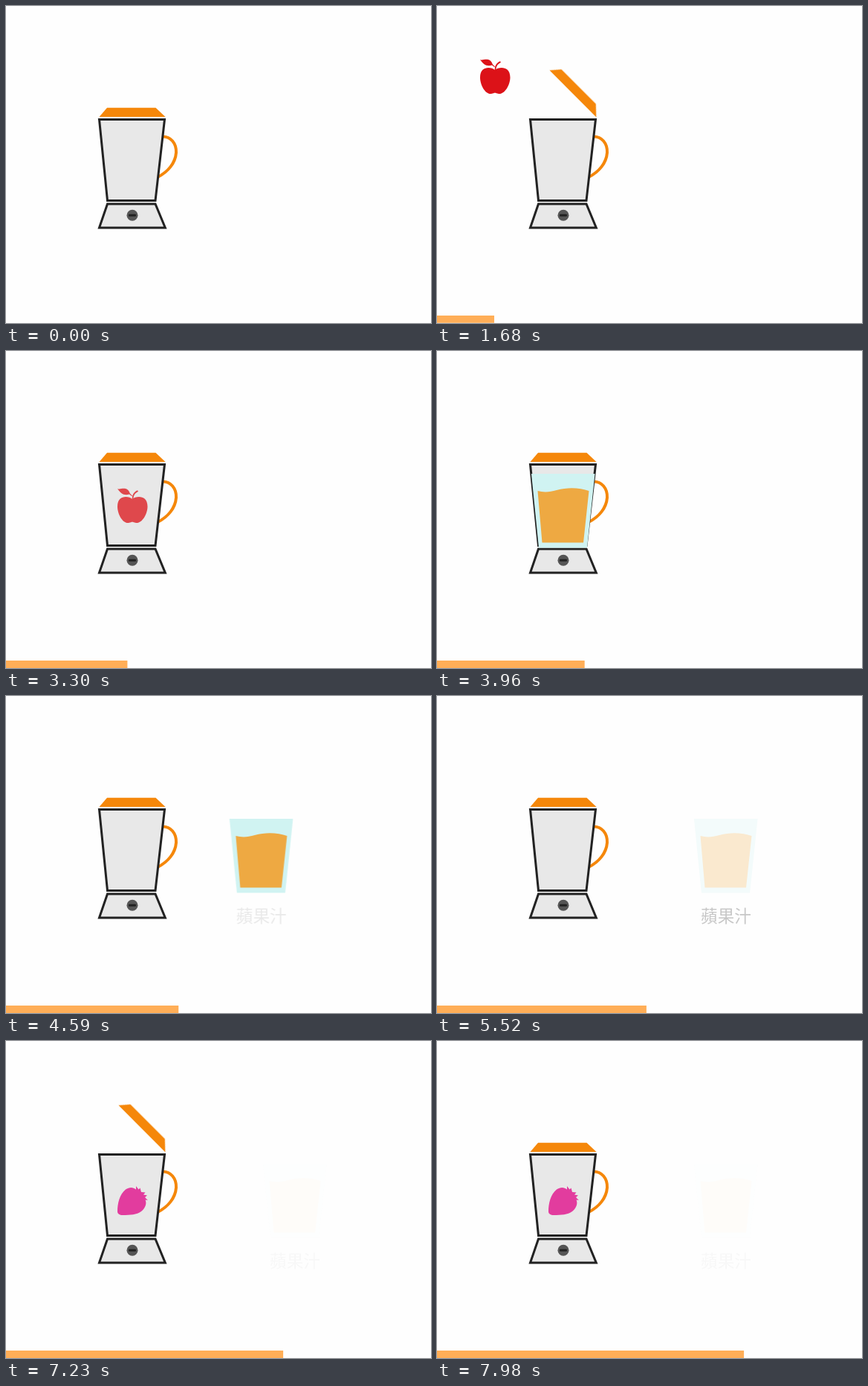
An HTML page for the animation above (8000 ms loop, 572 by 426 pixels).

```html
<!DOCTYPE html>
<html lang="zh-Hant">
<head>
<meta charset="utf-8">
<title>果汁機</title>
<style>
  html, body { margin: 0; width: 100%; height: 100%; overflow: hidden; background: #fefefe; }
  svg { display: block; width: 572px; height: 426px; }

  .lid, .bar, .fruit, .drink, .label { animation: 8s linear infinite; }
  .metal { fill: #e8e8e8; stroke: #222; stroke-width: 3; }
  .orange { fill: #f5870a; }

  .lid { transform-origin: 214px 149px; animation-name: lid; }
  .bar { fill: #ffae57; transform-origin: 0 0; animation-name: bar; }
  .apple { fill: #dc1218; animation-name: apple; }
  .berry { fill: #e23c9e; animation-name: berry; }
  .drink { animation-name: drink; }
  .label {
    font: 500 22.6px "Noto Sans CJK TC", "Noto Sans CJK", "Noto Sans CJK JP", sans-serif;
    text-anchor: middle;
    fill: #222;
    animation-name: label;
  }

  @keyframes bar {
    0%, 2.95% { transform: scaleX(0); }
    100% { transform: scaleX(1); }
  }
  @keyframes lid {
    0%, 8.56% { transform: rotate(0deg); }
    14.81%, 30.87% { transform: rotate(45deg); }
    37.12%, 77.16% { transform: rotate(0deg); }
    83.41%, 91.6% { transform: rotate(45deg); }
    97.85%, 100% { transform: rotate(0deg); }
  }
  @keyframes apple {
    0%, 12% { opacity: 0; transform: translate(0, 0); }
    16%, 21.4% { opacity: 1; transform: translate(0, 0); }
    25.2% { transform: translate(60px, 28px); }
    29%, 40% { opacity: 1; transform: translate(92px, 113px); }
    45%, 100% { opacity: 0; transform: translate(92px, 113px); }
  }
  @keyframes berry {
    0%, 74% { opacity: 0; transform: translate(0, 0); }
    78%, 82.2% { opacity: 1; transform: translate(0, 0); }
    86% { transform: translate(60px, 30px); }
    89.8%, 100% { opacity: 1; transform: translate(92px, 120px); }
  }
  @keyframes drink {
    0%, 42.5% { opacity: 0; transform: translateX(0); }
    47.5%, 51.2% { opacity: 1; transform: translateX(0); }
    59%, 64.2% { opacity: 1; transform: translateX(219px); }
    70.4%, 100% { opacity: .03; transform: translateX(219px); }
  }
  @keyframes label {
    0%, 57% { opacity: 0; }
    61%, 100% { opacity: 1; }
  }
</style>
</head>
<body>
<svg viewBox="0 0 572 426">
  <path d="M210 175.500C222 175 229.500 185 229 197C228 211 218 223 204 230" fill="none" stroke="#f5870a" stroke-width="4"/>
  <path class="metal" d="M125.500 152.500H213.500L201 261.500H136.500Z"/>
  <path class="metal" d="M136.500 266H201L214.300 298H125.500Z"/>
  <circle cx="170" cy="281.200" r="7.500" fill="#555"/>
  <rect x="165" y="279.700" width="10" height="3" rx="1" fill="#222"/>

  <g class="drink">
    <path d="M127 165H212.500L202 264.500H137Z" fill="#d0f3f2"/>
    <path d="M135.500 188C143 190 151 190 161 187C177 182.500 193 184 204.500 188L197 257.500H141.500Z" fill="#eea942"/>
    <text class="label" x="170" y="304">蘋果汁</text>
  </g>

  <g class="fruit apple">
    <path d="M78 86C73 81.500 58 80 58 96C58 106 65 119 73 118C76 117.500 76.500 116.800 78 116.800C79.500 116.800 80 117.500 83 118C91 119 98.500 106 98.500 96C98.500 80 83 81.500 78 86Z"/>
    <path d="M58 72C61 73.500 64 71 69 72C73 73 74 76.500 75 78.500L78 81.500L77.500 82.300L74 79.500C67 82 62 78 58 72Z"/>
    <path d="M77.800 87C77.300 81 80 76 85 74.200L86 75.700C81.500 78 79.300 81 79.400 87Z"/>
  </g>

  <path class="fruit berry" d="M58 109C58 98 61 86 69 79.500C74 76 79 76 83 79.500L83 75L86.500 79.500L88.500 77.500L90 83L95.500 83.500L93 86.500L98 87.500L95 90L98.800 94L95.500 93.500C98 99 95 105 90 109C84 113.500 75 114 65 114C61 114 58 112.500 58 109Z"/>

  <path class="lid orange" d="M125.500 149L136 136.700H201.500L214.500 149Z"/>
  <rect class="bar" y="416" width="414.100" height="10"/>
</svg>
</body>
</html>
```
